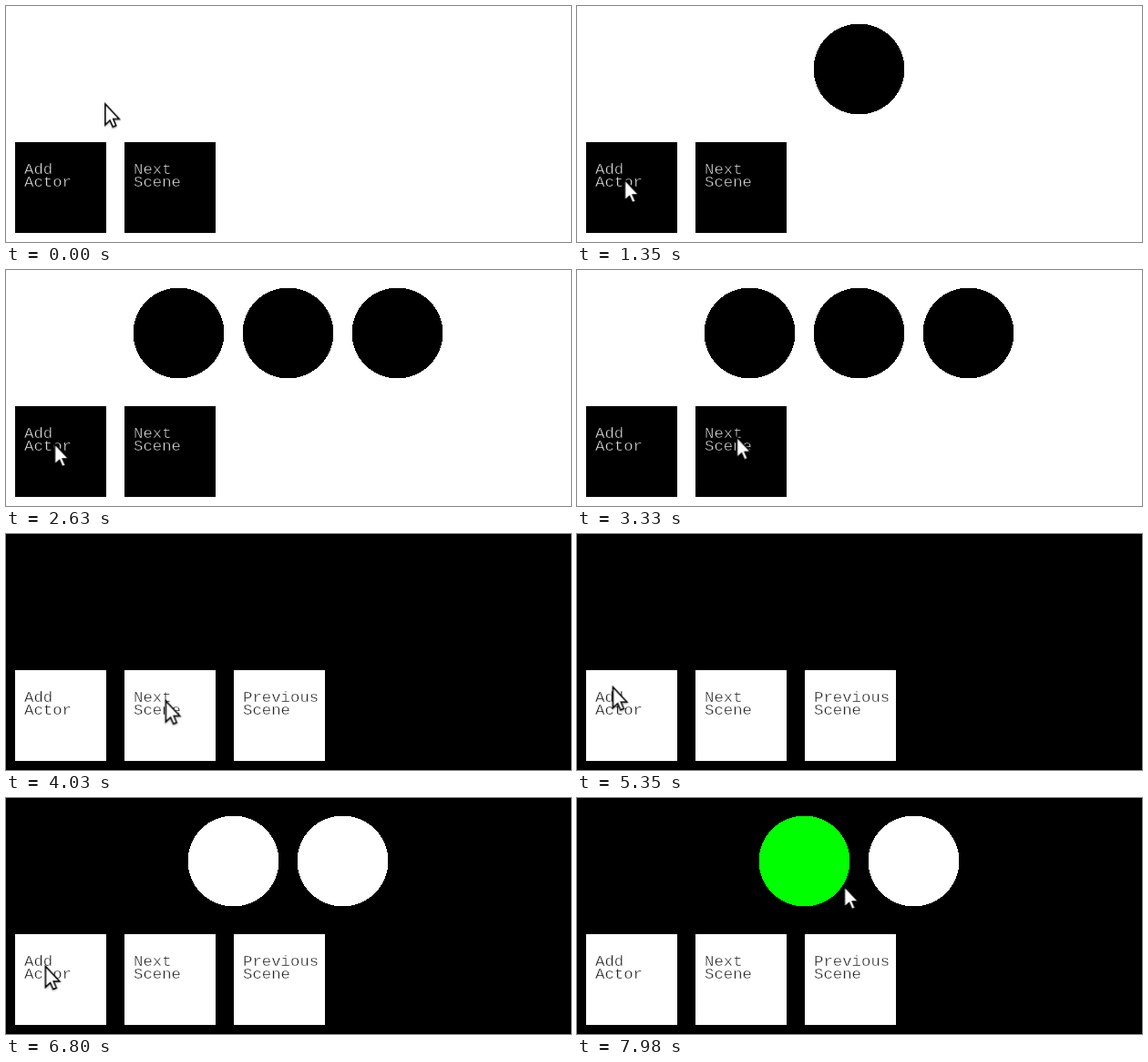
An HTML page for the animation above (8000 ms loop, 620 by 260 pixels).

```html
<!DOCTYPE html>
<html lang="en">
<head>
<meta charset="utf-8">
<title>Actors and scenes</title>
<style>
  html, body { margin: 0; width: 100%; height: 100%; overflow: hidden; background: #fff; }
  svg { display: block; width: 620px; height: 260px; }
  text { font: 17.33px "Liberation Mono", "Courier New", monospace; }
  circle { r: 49.95px; fill: currentColor; shape-rendering: crispEdges; }

  .light { color: #000; --label: #ddd; }
  .dark { color: #fff; --label: #222; }
  .button rect { fill: currentColor; }
  /* The stroke in the button colour thins the letters */
  .button text { fill: var(--label); stroke: currentColor; stroke-width: .45px; }

  .dark, circle, .row, .x, .y { animation: 8s linear infinite; }
  .dark, circle { animation-timing-function: step-end; }

  /* Scene change and actors appearing */
  .dark { animation-name: scene; }
  .a1 { animation-name: a1; }
  .a2 { animation-name: a2; }
  .a3 { animation-name: a3; }
  .b1 { animation-name: b1, hover; }
  .b2 { animation-name: b2; }
  @keyframes scene { 0% { opacity: 0 } 50.375%, 100% { opacity: 1 } }
  @keyframes a1 { 0% { opacity: 0 } 16.875%, 100% { opacity: 1 } }
  @keyframes a2 { 0% { opacity: 0 } 20%, 100% { opacity: 1 } }
  @keyframes a3 { 0% { opacity: 0 } 31.625%, 100% { opacity: 1 } }
  @keyframes b1 { 0% { opacity: 0 } 74.75%, 100% { opacity: 1 } }
  @keyframes b2 { 0% { opacity: 0 } 84.125%, 100% { opacity: 1 } }
  @keyframes hover { 0% { fill: #fff } 98.25%, 100% { fill: #0f0 } }

  /* The row slides left to stay centred */
  .light .row { animation-name: slide-a; }
  .dark .row { animation-name: slide-b; }
  @keyframes slide-a {
    0%, 19.99% { transform: translateX(0) }
    20% { transform: translateX(-9px) }
    21.06%, 31.615% { transform: translateX(-60px) }
    31.625% { transform: translateX(-70px) }
    32.66%, 100% { transform: translateX(-120px) }
  }
  @keyframes slide-b {
    0%, 84.115% { transform: translateX(0) }
    84.125% { transform: translateX(-19px) }
    84.975%, 100% { transform: translateX(-60px) }
  }

  /* Pointer: each axis has its own easing */
  .x { animation-name: pointer-x; }
  .y { animation-name: pointer-y; }
  .x, .y { animation-timing-function: ease-in-out; }
  @keyframes pointer-x {
    0%, 4.6% { transform: translateX(108px) }
    8.125%, 10.5% { transform: translateX(49px) }
    12% { transform: translateX(41px) }
    13.5%, 22.5% { transform: translateX(51.5px) }
    24.375%, 36.4% { transform: translateX(52.5px) }
    41.625%, 61.4% { transform: translateX(174.5px) }
    66.875% { transform: translateX(38.5px) }
    69.375% { transform: translateX(42.5px) }
    91.7% { transform: translateX(42.5px); animation-timing-function: cubic-bezier(.4, 0, .8, .8) }
    99.75%, 100% { transform: translateX(292.5px) }
  }
  @keyframes pointer-y {
    0%, 4.6% { transform: translateY(106.5px) }
    8.125% { transform: translateY(164px) }
    10.5% { transform: translateY(164px); animation-timing-function: ease-in }
    12% { transform: translateY(178px); animation-timing-function: ease-out }
    13.5%, 36.4% { transform: translateY(190px) }
    41.625%, 61.4% { transform: translateY(182.5px) }
    64% { transform: translateY(83.5px); animation-timing-function: cubic-bezier(.4, 0, .8, .8) }
    66.875% { transform: translateY(167px); animation-timing-function: ease-out }
    69.375% { transform: translateY(184px) }
    91.7% { transform: translateY(184px); animation-timing-function: cubic-bezier(.4, 0, .8, .8) }
    99.75%, 100% { transform: translateY(96px) }
  }
  .pointer {
    fill: #fff; stroke: #000; stroke-width: 1.5;
    filter: drop-shadow(0 1px 1px rgba(0, 0, 0, .3));
  }
</style>
</head>
<body>
<svg viewBox="0 0 620 260">
  <defs>
    <g id="buttons" class="button">
      <rect x="10" y="150" width="100" height="100"/>
      <text x="20" y="185">Add</text>
      <text x="20" y="199">Actor</text>
      <rect x="130" y="150" width="100" height="100"/>
      <text x="140" y="185">Next</text>
      <text x="140" y="199">Scene</text>
    </g>
  </defs>

  <g class="light">
    <use href="#buttons"/>
    <g class="row">
      <circle class="a1" cx="309.5" cy="69.5"/>
      <circle class="a2" cx="429.5" cy="69.5"/>
      <circle class="a3" cx="549.5" cy="69.5"/>
    </g>
  </g>

  <g class="dark">
    <rect width="620" height="260" fill="#000"/>
    <use href="#buttons"/>
    <g class="button">
      <rect x="250" y="150" width="100" height="100"/>
      <text x="260" y="185">Previous</text>
      <text x="260" y="199">Scene</text>
    </g>
    <g class="row">
      <circle class="b1" cx="309.5" cy="69.5"/>
      <circle class="b2" cx="429.5" cy="69.5"/>
    </g>
  </g>

  <g class="x"><g class="y">
    <path class="pointer" d="M.9 1.5V24.4L6.1 19.5 9.3 26.8 12.8 25.3 9.7 18.1H16.3Z"/>
  </g></g>
</svg>
</body>
</html>
```
